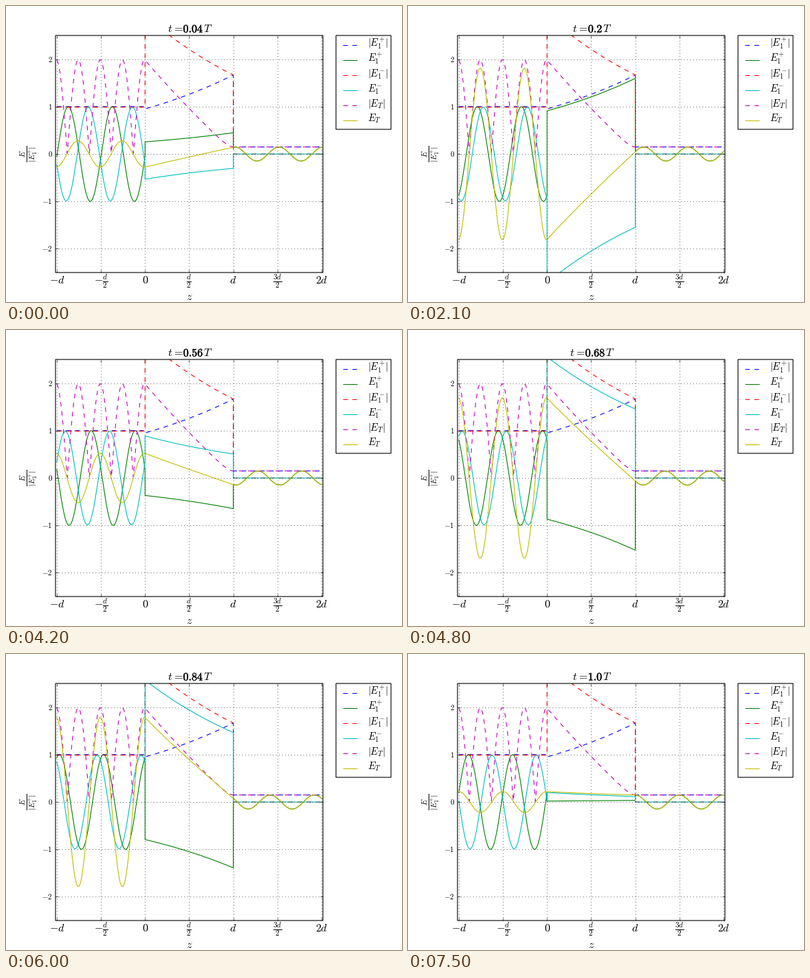
These frames come from a looping animation (576 px wide and 432 px high, 7800 ms). A matplotlib script:

```python
import numpy as np
import matplotlib.pyplot as plt
from matplotlib.animation import FuncAnimation
from matplotlib.patches import Rectangle
from matplotlib.patheffects import withStroke

W, H, DPI = 576, 432, 80
STEPS = 25

plt.rcParams.update({
    "mathtext.fontset": "cm",
    "lines.linewidth": 1.0,
    "lines.scale_dashes": False,
    "axes.axisbelow": False,
})

# Slab with negative permittivity; lengths in units of d.
K = 4 * np.pi
INDEX = -1j * np.sqrt(0.002)
PHASE = 0.024


def solve_fields():
    """Forward and backward complex amplitudes for a unit incident wave."""
    left, slab, right = (np.linspace(a, a + 1, 500) for a in (-1, 0, 1))
    fwd2 = 0.5 * (1 + 1 / INDEX) * np.exp(1j * K * INDEX * (slab - 1))
    bwd2 = 0.5 * (1 - 1 / INDEX) * np.exp(-1j * K * INDEX * (slab - 1))
    total = fwd2[0] + bwd2[0]
    slope = INDEX * (fwd2[0] - bwd2[0])
    incident, reflected = (total + slope) / 2, (total - slope) / 2
    fwd = np.r_[incident * np.exp(1j * K * left), fwd2,
                np.exp(1j * K * (right - 1))]
    bwd = np.r_[reflected * np.exp(-1j * K * left), bwd2, 0 * right]
    scale = np.exp(1j * PHASE) / abs(incident)
    return np.r_[left, slab, right], fwd * scale, bwd * scale


z, forward, backward = solve_fields()
waves = (forward, backward, forward + backward)

# Time labels run in alphabetical order, so "0.08T" precedes "0.0T".
labels = sorted(f"{k / STEPS}T" for k in range(STEPS + 1))

fig = plt.figure(figsize=(W / DPI, H / DPI), dpi=DPI, facecolor="white")
ax = fig.add_axes([0.125, 0.1, 0.675, 0.8])
ax.set_xlim(-1.015, 2.015)
ax.set_ylim(-2.5, 2.5)
x_ticks = np.arange(-1, 2.1, 0.5)
y_ticks = np.arange(-2, 3)
ax.set_xticks(x_ticks, [""] * len(x_ticks))
ax.set_yticks(y_ticks, [""] * len(y_ticks))
ax.tick_params(direction="in", length=4, width=0.5, top=True, right=True)
ax.grid(True, color="k", linewidth=0.5, linestyle=(0, (1, 3)))
ax.spines[:].set_visible(False)

# Overlay measured in pixels from the top left, for boxes, text and legend.
page = fig.add_axes([0, 0, 1, 1])
page.set_xlim(0, W)
page.set_ylim(H, 0)
page.axis("off")


def put(x, y, text, size, ha="center", va="baseline", **kw):
    return page.text(x, y, text, fontsize=size, ha=ha, va=va, **kw)


def box(x0, y0, x1, y1):
    page.add_patch(Rectangle((x0, y0), x1 - x0, y1 - y0, fill=False,
                             lw=1, snap=False))


def to_px(x, y):
    return 72 + (x + 1.015) * 388.8 / 3.03, 216 - y * 69.12


box(72, 43, 461, 389)
box(480, 43, 560, 180)

x_names = ["$-d$", r"$-\frac{d}{2}$", "$0$", r"$\frac{d}{2}$", "$d$",
           r"$\frac{3d}{2}$", "$2d$"]
for x, name in zip(x_ticks, x_names):
    put(to_px(x, 0)[0], 405, name, 14.4)
for y in y_ticks:
    put(67.6, to_px(0, y)[1], f"${y}$", 10, ha="right", va="center")
put(266.8, 429.3, "$z$", 14.4)
put(33, 216, r"$\frac{E}{|E_1^{+}|}$", 14.4, va="center", rotation=90)

# Title in three parts around the bold time value.
TITLE_X, TITLE_Y, EM = 272.6, 38.4, 16
lhs = put(0, TITLE_Y, r"$t\hspace{0.08}=\hspace{-0.2}$", 14.4, ha="right")
digits = put(TITLE_X, TITLE_Y, "", 14.4,
             path_effects=[withStroke(linewidth=0.35, foreground="k")])
rhs = put(0, TITLE_Y, "$T$", 14.4, ha="left")

DASH = (0, (6, 6))
names = ["E_1^{+}", "E_1^{-}", "E_T"]
colors = [("b", "g"), ("r", "c"), ("m", "y")]

moving = []
for i, (wave, name, (c_abs, c_real)) in enumerate(zip(waves, names, colors)):
    ax.plot(z, abs(wave), c_abs, ls=DASH)
    moving += ax.plot(z, wave.real, c_real)
    rows = ((c_abs, DASH, f"$|{name}|$"), (c_real, "-", f"${name}$"))
    for j, (color, style, text) in enumerate(rows):
        y = 56.5 + 22 * (2 * i + j)
        page.plot([490, 511], [y, y], color, ls=style,
                  solid_capstyle="butt")
        put(526, y + 2.5, text, 13, ha="left")


def draw(frame):
    value = labels[frame][:-1]
    turn = np.exp(-2j * np.pi * float(value))
    for line, wave in zip(moving, waves):
        line.set_ydata((wave * turn).real)
    half = EM * (0.5 * (len(value) - 1) + 0.278) / 2
    digits.set_text(rf"$\mathbf{{{value}}}$")
    lhs.set_x(TITLE_X - half)
    rhs.set_x(TITLE_X + half)
    return [*moving, lhs, digits, rhs]


anim = FuncAnimation(fig, draw, frames=len(labels), interval=300,
                     repeat=True, repeat_delay=0, blit=False)
plt.show()
```
